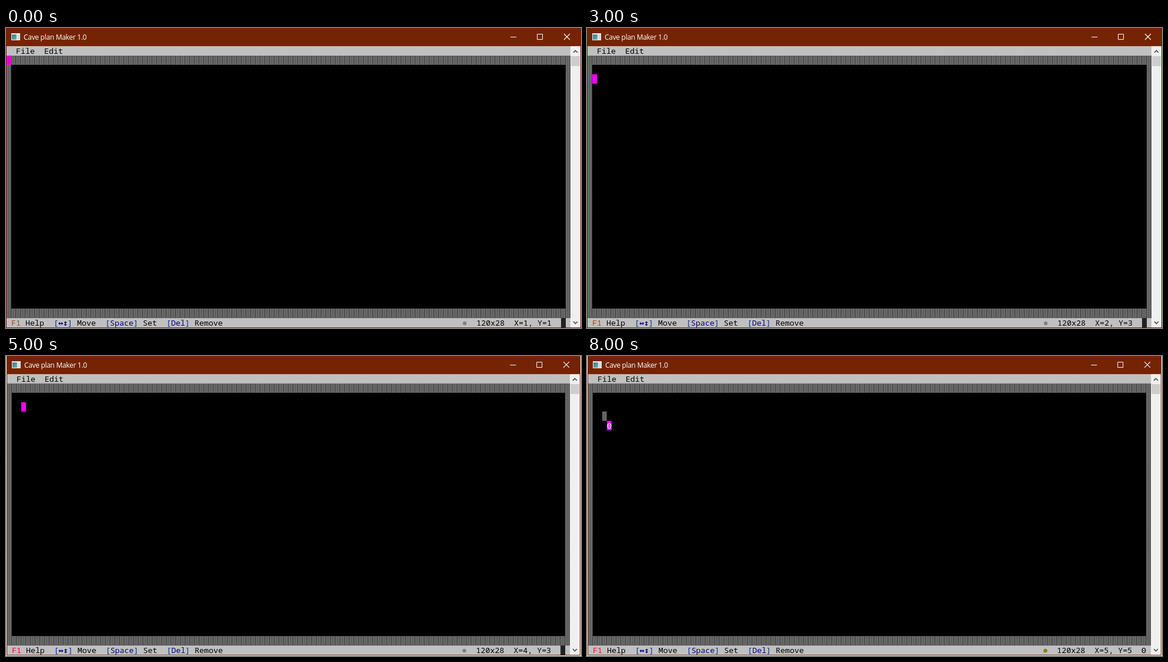
An HTML page that plays this animation: 979 px wide and 512 px high, repeating every 9000 ms.

```html
<!DOCTYPE html>
<html lang="en">
<head>
<meta charset="utf-8">
<title>Cave plan Maker 1.0</title>
<style>
  html, body { margin: 0; width: 979px; height: 512px; overflow: hidden; background: #fff; }
  svg { display: block; }
  .sharp rect { shape-rendering: crispEdges; }
  .mono { font: 13.33px "Noto Sans Mono", "DejaVu Sans Mono", monospace; }
  .arrow { font: bold 13.33px "DejaVu Sans Mono", monospace; }
  .theta { font: 13.33px "Liberation Mono", monospace; }
  .title { font: 12px "Open Sans", "Noto Sans", sans-serif; letter-spacing: -.3px; fill: #fff; }
</style>
</head>
<body>
<svg id="stage" width="979" height="512" viewBox="0 0 979 512"></svg>
<script>
const STEP_MS = 1000;
const KEY = '#000080', BRACKET = '#00308a';

// One row per second: cursor column and row, then which edits are done.
const steps = [
  { x: 1, y: 1 },
  { x: 2, y: 1 },
  { x: 2, y: 2 },
  { x: 2, y: 3 },
  { x: 3, y: 3 },
  { x: 4, y: 3, tight: true },
  { x: 4, y: 4, tight: true, wall: true },
  { x: 5, y: 4, tight: true, wall: true, theta: true },
  { x: 5, y: 5, tight: true, wall: true, theta: true, placed: true }
];

const stage = document.getElementById('stage');

const shade = (id, light, dark, seam) =>
  `<pattern id="${id}" x="1" y="47" width="8" height="2" patternUnits="userSpaceOnUse">
    <rect width="8" height="2" fill="${light}"/>
    <rect y="1" width="8" height="1" fill="${dark}"/>
    <rect x="3" width="1" height="2" fill="${seam}" opacity=".25"/>
    <rect x="7" width="1" height="2" fill="${seam}" opacity=".6"/>
  </pattern>`;

function draw(s) {
  const out = [];

  const rect = (x, y, x2, y2, fill) => out.push(
    `<rect x="${x}" y="${y}" width="${x2 - x}" height="${y2 - y}" fill="${fill}"/>`);

  const path = (d, x, y, color, width) => out.push(
    `<path d="${d}" transform="translate(${x} ${y})" fill="none" stroke="${color}" stroke-width="${width}"/>`);

  // Places each character in its own 8-pixel console cell.
  const text = (str, x, y, fill = '#000', font = 'mono') => {
    const xs = [...str].map((_, i) => x + i * 8).join(' ');
    out.push(`<text class="${font}" x="${xs}" y="${y}" fill="${fill}">${str}</text>`);
  };

  const key = (name, x, font) => {
    text('[', x, 508, BRACKET);
    text(name, x + 8, 508, KEY, font);
    text(']', x + 8 + name.length * 8, 508, BRACKET);
  };

  const cell = (x, y, fill) => {
    const left = 1 + (x - 1) * 8, top = 47 + (y - 1) * 16;
    rect(left, top, left + 8, top + 16, fill);
  };

  out.push('<defs>',
    shade('wall', '#8c8c8c', '#444', '#222'),
    shade('hotWall', '#ff00f0', '#d800cc', '#b000b0'),
    shade('inkWall', '#444', '#000', '#000'),
    '<linearGradient id="pane" x2="1" y2="1"><stop stop-color="#2f7f86"/><stop offset="1" stop-color="#6fb5ae"/></linearGradient>',
    '</defs>');

  // The tight window is shrunk slightly, leaving a white margin.
  out.push(s.tight
    ? `<g transform="translate(1 0) scale(${977 / 979} ${511 / 512})">`
    : '<g class="sharp">');

  // Window frame and title bar
  rect(0, 0, 979, 512, '#6a2508');
  rect(0, 0, 979, 31, '#742403');
  rect(9, 9, 24, 21, '#f0f0f0');
  rect(10, 11, 18, 20, 'url(#pane)');
  rect(19, 11, 23, 20, '#d4dcdc');
  out.push('<text class="title" x="30" y="20">Cave plan Maker 1.0</text>');
  rect(859, 15, 869, 16, '#fff');
  path('M.5 .5H9.5V9.5H.5Z', 904, 10, '#fff', 1);
  path('M0 0L10 10M10 0L0 10', 950, 10, '#fff', 1.1);

  // Map with its walls
  rect(1, 31, 961, 47, '#c0c0c0');
  text('File', 17, 44);
  text('Edit', 65, 44);
  rect(1, 47, 961, 495, 'url(#wall)');
  rect(9, 63, 953, 479, '#000');
  if (s.wall) cell(4, 4, 'url(#wall)');
  const onWall = s.y === 1 || (s.wall && s.x === 4 && s.y === 4);
  cell(s.x, s.y, onWall ? 'url(#hotWall)' : '#ff00ff');
  if (s.placed) text('Θ', 33, 124, '#fff', 'theta');

  // Status line
  rect(1, 495, 961, 511, '#c0c0c0');
  text('F1', 9, 508, s.tight ? '#ff0030' : '#a04818');
  text('Help', 33, 508);
  key('↔↕', 81, 'arrow');
  text('Move', 121, 508);
  key('Space', 169);
  text('Set', 233, 508);
  key('Del', 273);
  text('Remove', 321, 508);
  out.push(`<circle cx="781" cy="504" r="3.2" fill="${s.wall ? '#808000' : '#808080'}"/>`);
  text('120x28', 801, 508);
  text(`X=${s.x},`, 865, 508);
  text(`Y=${s.y}`, 905, 508);
  if (s.theta) text('Θ', 945, 508, s.placed ? '#000' : '#401000', 'theta');
  else rect(945, 495, 953, 511, 'url(#inkWall)');

  // Scroll bar
  rect(961, 31, 978, 511, '#f0f0f0');
  rect(962, 48, 977, 65, '#cdcdcd');
  path('M-3.5 2L0 -1.5L3.5 2', 969.5, 40, '#505050', 1.7);
  path('M-3.5 -2L0 1.5L3.5 -2', 969.5, 503, '#505050', 1.7);

  out.push('</g>');
  stage.innerHTML = out.join('');
}

let shown = -1;
function tick() {
  const now = Math.floor(performance.now() / STEP_MS) % steps.length;
  if (now !== shown) draw(steps[shown = now]);
  requestAnimationFrame(tick);
}
tick();
</script>
</body>
</html>
```
